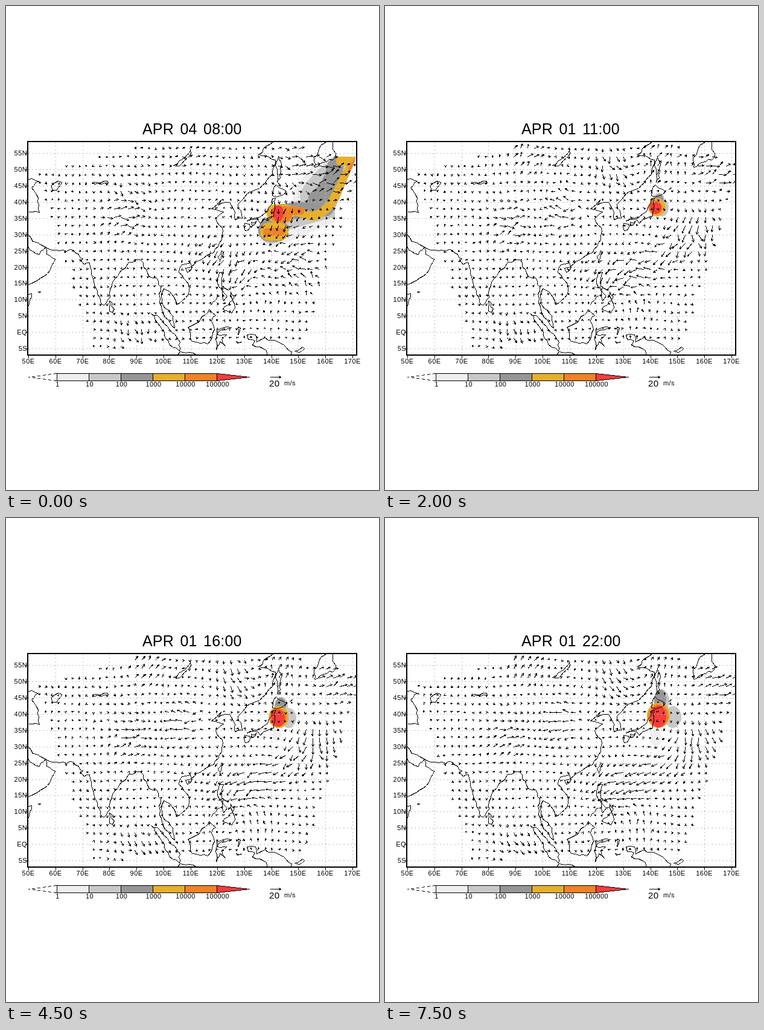
An HTML page for the animation above (8000 ms loop, 618 by 800 pixels).

```html
<!DOCTYPE html>
<html lang="en">
<head>
<meta charset="utf-8">
<title>Dispersion map</title>
<style>
html, body { margin: 0; width: 100%; height: 100%; overflow: hidden; background: #fff; }
svg { display: block; }
path, rect, ellipse { shape-rendering: crispEdges; }
text { font-family: "Liberation Sans", Arial, sans-serif; font-size: 11px; letter-spacing: .4px; }
#title { font-size: 25px; letter-spacing: .2px; word-spacing: 3.3px; }
#speed { font-size: 15px; }
.line { fill: none; stroke: #000; stroke-width: 1; }
.grid { fill: none; stroke: #bcbcbc; stroke-dasharray: 2 4; }
.band { fill: none; stroke-linecap: round; stroke-linejoin: round; }
</style>
</head>
<body>
<svg width="618" height="800" viewBox="0 0 618 800">
  <clipPath id="frame"><rect x="37" y="225" width="543" height="351"/></clipPath>
  <clipPath id="domain"><path d="M37 249H579V254L545 336V576H37Z"/></clipPath>
  <g clip-path="url(#frame)">
    <g id="plume" clip-path="url(#domain)"></g>
    <path id="grid" class="grid"/>
    <path id="coast" class="line"/>
    <path id="wind" class="line"/>
  </g>
  <rect x="36" y="224" width="545" height="353" fill="none" stroke="#000" stroke-width="2"/>
  <path id="ticks" class="line"/>
  <g id="labels"></g>
  <g id="legend"></g>
  <path id="unit" class="line"/>
  <text id="speed" x="436" y="629">20</text>
  <text x="461" y="627">m/s</text>
  <text id="title" x="226" y="212"></text>
</svg>
<script>
const STEP = 500, COUNT = 16;
const TONES = ['#efefef', '#c8c8c8', '#969696', '#e6af2d', '#f08228', '#fa3c3c'];
const $ = id => document.getElementById(id);
const snap = v => Math.round(v) + .5;
const noise = (a, b) => {
  const s = Math.sin(a * 12.99 + b * 78.23) * 43758.5;
  return s - Math.floor(s);
};

function add(parent, tag, attrs, content) {
  const el = document.createElementNS('http://www.w3.org/2000/svg', tag);
  for (const k in attrs) el.setAttribute(k, attrs[k]);
  if (content !== undefined) el.textContent = content;
  $(parent).appendChild(el);
}

// Coastlines: key points, roughened between
const COASTS = [
  // South and east Asia
  '37,378 44,389 63,397 70,401 88,404 111,403 127,418 122,420 129,427 138,424 146,460 157,492 162,494 172,481 172,468 180,450 203,423 222,419 237,447 249,449 256,470 254,490 263,514 279,532 276,512 260,495 257,480 261,467 274,476 282,493 301,477 302,459 286,440 291,427 305,424 307,430 321,420 344,407 357,386 359,372 347,351 360,340 340,335 356,320 352,328 370,324 379,340 379,353 391,350 384,327 403,307 420,301 441,278 446,254 418,245 442,224',
  // Arabia and Africa
  '37,398 44,405 55,410 65,398 67,410 81,418 72,437 46,456 37,460', '37,476 42,475 37,496', '53,472 57,472 55,473 53,472',
  // Southern islands
  '171,487 179,500 176,506 171,504 171,487',
  '240,508 250,511 274,539 288,555 287,570 270,559 255,529 240,508',
  '284,576 288,571 309,573 317,577',
  '301,531 319,522 336,501 347,511 340,520 345,534 334,558 308,554 301,531',
  '349,535 372,531 351,538 350,543 365,543 357,550 363,562 354,554 348,568 349,535',
  '384,530 388,532 386,540 384,543 384,530', '381,554 390,555 383,557 381,554',
  '433,577 431,569 408,560 412,553 401,551 399,543 413,543 415,555 429,548 460,560 473,571 471,577',
  '478,570 491,563 494,566 485,572 478,570',
  '297,433 308,431 300,440 297,433', '357,404 359,406 354,421 351,414 357,404',
  '353,440 360,440 357,462 368,469 353,465 350,457 353,440',
  '357,467 361,474 366,479 360,487 357,467', '372,472 378,480 375,485 372,472', '340,494 354,478',
  '359,501 375,486 379,499 374,507 359,501',
  // Northern islands
  '395,359 403,360 401,370 396,371 395,359', '406,357 415,355 408,363 406,357',
  '399,355 422,347 433,339 440,327 441,318 446,317 443,347 426,353 421,359 417,353 399,355',
  '441,313 447,295 464,306 454,313 441,313', '449,292 447,258 451,248 455,257 454,284 449,292',
  '511,266 510,250 522,229 530,224', '511,266 525,258 545,250 541,224', '470,303 475,299', '484,293 487,290',
  // Inland waters
  '37,286 53,289 42,300 53,317 55,341 37,340', '75,296 86,289 92,291 84,304 76,304 75,296',
  '143,292 168,289 169,292 146,294', '277,263 296,250 305,238 304,247 287,264 277,263'
];

function rough(list) {
  const pts = list.split(' ').map(p => p.split(',').map(Number));
  let d = `M${snap(pts[0][0])} ${snap(pts[0][1])}`;
  for (let k = 1; k < pts.length; k++) {
    const [x, y] = pts[k - 1], dx = pts[k][0] - x, dy = pts[k][1] - y;
    const len = Math.hypot(dx, dy), n = Math.max(1, Math.round(len / 6));
    for (let i = 1; i <= n; i++) {
      const off = i < n ? (noise(x + i, y) - .5) * 4 / len : 0;
      d += `L${snap(x + dx * i / n - dy * off)} ${snap(y + dy * i / n + dx * off)}`;
    }
  }
  return d;
}
$('coast').setAttribute('d', COASTS.map(rough).join(''));

// Axes
let grid = '', ticks = '';
for (let lon = 50; lon <= 170; lon += 10) {
  const x = Math.round(37 + (lon - 50) * 4.475);
  if (lon > 50) grid += `M${x}.5 225V576`;
  ticks += `M${x}.5 577v5`;
  add('labels', 'text', { x, y: 591, 'text-anchor': 'middle' }, lon + 'E');
}
for (let lat = -5; lat <= 55; lat += 5) {
  const y = Math.round(539 - lat * 5.373);
  grid += `M37 ${y}.5H580`;
  ticks += `M32 ${y}.5h4`;
  const name = lat ? Math.abs(lat) + (lat < 0 ? 'S' : 'N') : 'EQ';
  add('labels', 'text', { x: 35, y: y + 4, 'text-anchor': 'end' }, name);
}
$('grid').setAttribute('d', grid);
$('ticks').setAttribute('d', ticks);

// Colour bar
add('legend', 'path', { d: 'M84 607.5L37 613.5 84 619.5', class: 'line', 'stroke-dasharray': '5 4' });
TONES.forEach((fill, i) => {
  const x = 84.5 + i * 53;
  const d = i < 5 ? `M${x} 607.5h53v12h-53Z` : `M${x} 607.5L404 613.5 ${x} 619.5Z`;
  add('legend', 'path', { d, fill, stroke: '#000' });
  add('legend', 'text', { x: x + 1, y: 629, 'text-anchor': 'middle' }, 10 ** i);
});

// Wind: gusts as x, y, u, v over a weak wavy flow
const EARLY = [
  [545,272,13,-2], [442,270,0,-10], [380,265,7,8], [515,370,5,9], [480,405,-7,8],
  [410,440,-12,4], [350,445,-8,4], [295,338,-9,1], [210,365,9,-4], [205,545,8,5],
  [430,495,2,-9], [230,243,3,-6]
];
const LATE = [
  [535,285,14,-4], [490,262,9,5], [450,355,-5,8], [490,425,-8,7], [508,455,-4,-8],
  [435,480,2,-9], [395,440,-9,7], [352,395,-4,7], [190,345,9,-6], [205,545,8,5],
  [210,295,1,7], [320,250,6,-5]
];

function arrow(x, y, u, v) {
  const ex = snap(x + u), ey = snap(y + v), a = Math.atan2(v, u);
  const barb = s => `${snap(ex - .5 - 3.6 * Math.cos(a + s))} ${snap(ey - .5 - 3.6 * Math.sin(a + s))}`;
  return `M${snap(x)} ${snap(y)}L${ex} ${ey}M${barb(.5)}L${ex} ${ey} ${barb(-.5)}`;
}

function windPath(gusts, hour) {
  let d = '';
  for (let j = 0; j < 24; j++) {
    const first = Math.round(Math.max(14 - 4.8 * j, .42 * (j - 3)));
    const last = j < 23 ? Math.round(Math.min(38 + 5 * j, 46 - .4 * (j - 3))) : 12;
    for (let i = first; i <= last; i++) {
      const x = 55 + i * 11.35, y = 235 + j * 14.26;
      let u = 2.5 * Math.cos(x * .031 + y * .017 + hour * .05);
      let v = 2.5 * Math.sin(y * .035 - x * .022 + hour * .05);
      for (const [gx, gy, gu, gv] of gusts) {
        const w = Math.exp(-((x - gx) ** 2 + (y - gy) ** 2) / 1800);
        u += gu * w;
        v += gv * w;
      }
      const n = noise(i, j);
      const size = Math.min(14, Math.max(3, Math.hypot(u, v) * (.85 + .3 * n)));
      const a = Math.atan2(v, u) + (n - .5) * .8 + .25 * Math.sin(hour * .3 + n * 6);
      d += arrow(x - 1, y, size * Math.cos(a), size * Math.sin(a));
    }
  }
  return d;
}
$('unit').setAttribute('d', arrow(437, 613, 18, 0));

// Young plume: tone, then x, y, rx, ry at its first and last hour
const PUFFS = [
  [0, [448,350,4,4], [449,363,9,14]],
  [1, [453,334,9,14], [477,329,14,18]],
  [1, [452,328,9,9], [458,303,13,20]],
  [2, [453,328,7,7], [456,299,10,15]],
  [3, [450,335,12,13], [453,326,19,21]],
  [4, [446,335,10,9], [453,327,17,19]],
  [5, [447,336,8,7], [453,328,13,18]]
];

function drawYoung(hour) {
  const p = ((hour - 9) / 13) ** .7;
  for (const [tone, from, to] of PUFFS) {
    const [cx, cy, rx, ry] = from.map((a, i) => a + (to[i] - a) * p);
    add('plume', 'ellipse', { cx, cy, rx, ry, fill: TONES[tone] });
  }
}

// Mature plume: tone, width and course of each band
const BANDS = [
  [0, 50, 'M500 316Q516 284 550 270M440 374L545 330'],
  [1, 42, 'M508 314Q528 284 556 270M440 372L460 350 540 328'],
  [2, 27, 'M514 318Q540 300 546 264M445 342L530 334'],
  [2, 37, 'M436 371H450'],
  [3, 15, 'M478 338L508 348Q535 340 549 308L576 256M554 256H578'],
  [3, 30, 'M447 343H463M436 373H453'],
  [4, 27, 'M451 344H461'],
  [4, 13, 'M460 338L488 339M432 374L457 373'],
  [4, 8, 'M571 270L577 258'],
  [5, 17, 'M451 338V347']
];

function drawMature() {
  for (const [tone, width, d] of BANDS)
    add('plume', 'path', { d, class: 'band', stroke: TONES[tone], 'stroke-width': width });
}

function draw(step) {
  const late = step === 0, hour = late ? 8 : step + 7;
  $('title').textContent = `APR ${late ? '04' : '01'} ${String(hour).padStart(2, '0')}:00`;
  $('wind').setAttribute('d', windPath(late ? LATE : EARLY, hour));
  $('legend').style.display = step === 1 ? 'none' : '';
  $('plume').replaceChildren();
  if (late) drawMature();
  else if (step > 1) drawYoung(hour);
}

const start = performance.now();
let shown = -1;
function tick() {
  const step = Math.floor((performance.now() - start) / STEP) % COUNT;
  if (step !== shown) draw(shown = step);
  requestAnimationFrame(tick);
}
tick();
</script>
</body>
</html>
```
